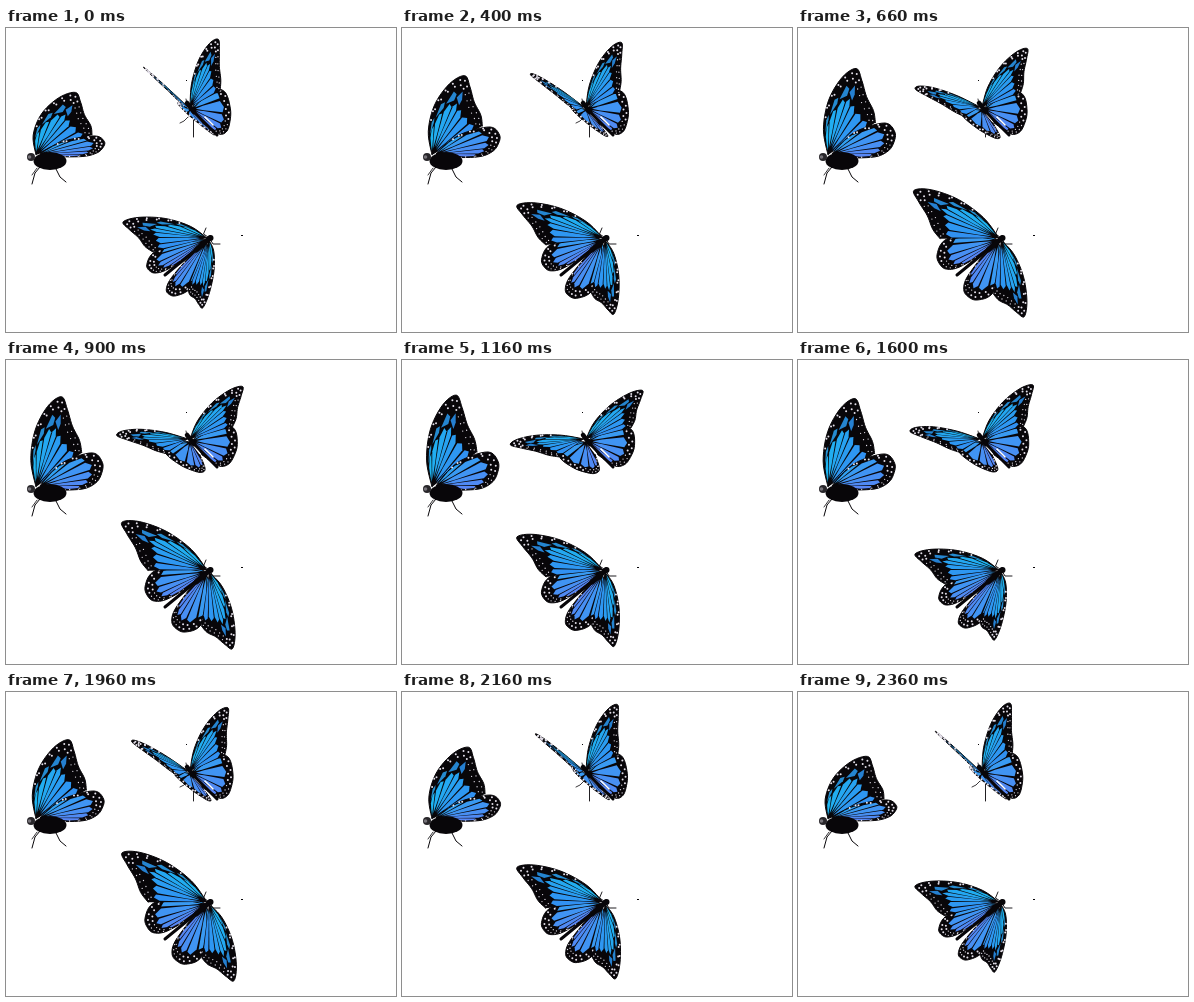
An HTML page with a canvas that plays this animation: 390 px wide and 304 px high, repeating every 2.4 s.

```html
<!DOCTYPE html>
<html lang="en">
<head>
<meta charset="utf-8">
<title>Butterflies</title>
<style>
  html, body { margin: 0; width: 100%; height: 100%; overflow: hidden; background: #fff; }
  canvas { display: block; }
</style>
</head>
<body>
<canvas id="stage" width="390" height="304"></canvas>
<script>
const ctx = document.getElementById('stage').getContext('2d');
const INK = '#080609';
const STEPS = 72, RATE = 0.03;   // pictures per loop, pictures per ms

const lerp = (a, b, k) => a + (b - a) * k;
const wave = x => (1 - Math.cos(Math.PI * x)) / 2;

// Point on a smooth curve through the keys, s from 0 to 1.
function along(keys, s) {
  const x = s * (keys.length - 1);
  const i = Math.min(Math.floor(x), keys.length - 2), f = x - i;
  const key = j => keys[Math.max(0, Math.min(keys.length - 1, j))];
  return [0, 1].map(d => {
    const [p, q, r, t] = [key(i - 1)[d], key(i)[d], key(i + 1)[d], key(i + 2)[d]];
    return q + f / 2 * (r - p + f * (2 * p - 5 * q + 4 * r - t + f * (3 * (q - r) + t - p)));
  });
}

// Wing rims in root space: [1, 0] is the tip, [0, 1] the rear corner.
// Cells fan out from the root to the radius given by reach(s).
const FORE = {
  rim: [[0, 0], [0.43, -0.35], [0.81, -0.47], [1.02, -0.31], [1.01, 0], [0.77, 0.26], [0.48, 0.53], [0.2, 0.84], [0, 1]],
  from: 0.15, to: 0.98, cells: 7, hue: [197, 210], light: [53, 57],
  reach: s => 0.6 + 0.28 * s * s, apex: 0.68
};
const HIND = {
  rim: [[0, 0], [0.35, -0.2], [0.75, -0.3], [1, -0.02], [0.74, 0.5], [0.42, 0.85], [0.16, 1.03], [-0.03, 0.97], [-0.1, 0.5]],
  from: 0.17, to: 0.92, cells: 6, hue: [205, 222], light: [57, 65],
  reach: () => 0.84, apex: 0
};

function polygon(points, color) {
  ctx.beginPath();
  points.forEach(q => ctx.lineTo(...q));
  ctx.closePath();
  ctx.fillStyle = color;
  ctx.fill();
}

function dot(x, y, r, color = INK) {
  ctx.beginPath();
  ctx.arc(x, y, r, 0, 7);
  ctx.fillStyle = color;
  ctx.fill();
}

function line(points, width = 1, color = INK) {
  ctx.beginPath();
  points.forEach(q => ctx.lineTo(...q));
  ctx.lineWidth = width;
  ctx.strokeStyle = color;
  ctx.stroke();
}

// Offset from the root, swinging from one point to another.
function swing(root, shut, open, p) {
  const polar = q => [Math.atan2(q[1] - root[1], q[0] - root[0]), Math.hypot(q[0] - root[0], q[1] - root[1])];
  const [a, m] = polar(shut), [b, n] = polar(open);
  const turn = Math.atan2(Math.sin(b - a), Math.cos(b - a));
  const angle = a + turn * p, size = lerp(m, n, p);
  return [size * Math.cos(angle), size * Math.sin(angle)];
}

// tip and corner are [shut, open] pairs.
function drawWing(wing, p, root, tip, corner) {
  const u = swing(root, ...tip, p), v = swing(root, ...corner, p);
  const at = (s, r) => {
    const [a, b] = along(wing.rim, s);
    return [0, 1].map(d => root[d] + r * (a * u[d] + b * v[d]));
  };
  const rim = Array.from({ length: 49 }, (_, i) => at(i / 48, 1));
  polygon(rim, INK);
  line(rim, 1);

  const span = (wing.to - wing.from) / wing.cells;
  for (let i = 0; i < wing.cells; i++) {
    const mid = wing.from + span * (i + 0.5);
    const l = mid - span * 0.41, r = mid + span * 0.41;
    const end = wing.reach(mid), k = i / (wing.cells - 1);
    const hue = lerp(...wing.hue, k), light = lerp(...wing.light, k);
    polygon([at(mid, 0.1), at(l, 0.3), at(l, end - 0.07), at(mid, end), at(r, end - 0.05), at(r, 0.3)],
      `hsl(${hue} 88% ${light}%)`);
    if (mid < wing.apex) {
      polygon([at(l, end + 0.04), at(mid, end + 0.16), at(r, end + 0.11), at(r, end + 0.03)],
        `hsl(${hue + 5} 70% 48%)`);
    }
  }
  for (let i = 0; i < 26; i++) {
    const s = lerp(0.2, 0.95, i / 25);
    dot(...at(s, i % 2 ? 0.95 : 0.88), 0.65 + 0.35 * (s < 0.6), '#e4e0ea');
  }
}

function drawLeft(p) {
  line([[34, 139], [29, 145], [26, 156]]);
  line([[31, 140], [26, 147]], 0.8);
  line([[49, 139], [54, 149], [60, 154]]);
  drawWing(FORE, p, [30, 127], [[69, 65], [54, 36]], [[86, 107], [75, 92]]);
  drawWing(HIND, p, [34, 126], [[90, 108], [87, 92]], [[80, 128], [80, 128]]);
  ctx.beginPath();
  ctx.ellipse(44, 133, 16.5, 9, 0, 0, 7);
  ctx.fillStyle = INK;
  ctx.fill();
  dot(25, 129, 4, '#28262a');
  dot(23.5, 129, 1.8, '#77747a');
}

function drawTop(p) {
  line([[187.5, 92], [187.5, 109]], 0.9);
  line([[182, 89], [178, 93], [174, 95]], 0.8);
  drawWing(HIND, p, [184, 82], [[177, 82], [158, 98]], [[208, 106], [197, 110]]);
  drawWing(FORE, p, [182, 79], [[139, 41], [109, 85]], [[180, 80], [157, 97]]);
  drawWing(HIND, p, [186, 81], [[219, 64], [230, 70]], [[214, 106], [214, 106]]);
  drawWing(FORE, p, [184, 79], [[212, 12], [240, 31]], [[214, 63], [229, 68]]);
  line([[199, 89], [207, 97]], 1.6, '#fff');
  line([[181, 75], [188, 84]], 4.5);
  line([[186, 82], [211, 107]], 3);
  line([[181, 76], [180, 71]], 0.8);
}

function drawBottom(p) {
  line([[202, 209], [197.5, 206], [200, 200]], 0.9);
  line([[204, 211], [207, 216], [214, 216]], 0.9);
  drawWing(HIND, p, [200, 212], [[147, 225], [146, 212]], [[160, 242], [158, 240]]);
  drawWing(HIND, p, [200, 214], [[184, 261], [194, 267]], [[164, 252], [168, 252]]);
  drawWing(FORE, p, [201, 210], [[118, 194], [117, 161]], [[147, 224], [142, 210]]);
  drawWing(FORE, p, [203, 212], [[197, 279], [228, 288]], [[182, 262], [196, 266]]);
  line([[204, 210], [190, 222]], 5);
  line([[192, 220], [159, 247]], 3);
  dot(204.5, 210, 3);
}

function draw(now) {
  const n = Math.floor(now * RATE + 0.2) % STEPS;
  const half = (STEPS - 1) / 2;
  ctx.fillStyle = '#fff';
  ctx.fillRect(0, 0, 390, 304);
  ctx.lineCap = ctx.lineJoin = 'round';

  drawLeft(1 - ((n - half) / half) ** 2);
  drawTop(wave((n - 0.5) / 36));
  // One slow beat, then one twice as quick.
  drawBottom(n < 48 ? wave(n / 23.6) : wave((n - 48) / 11.7));

  ctx.fillStyle = INK;
  ctx.fillRect(180, 52, 1, 1);
  ctx.fillRect(235, 207, 2, 1);
}

const start = performance.now();
function tick() {
  draw(performance.now() - start);
  requestAnimationFrame(tick);
}
tick();
</script>
</body>
</html>
```
